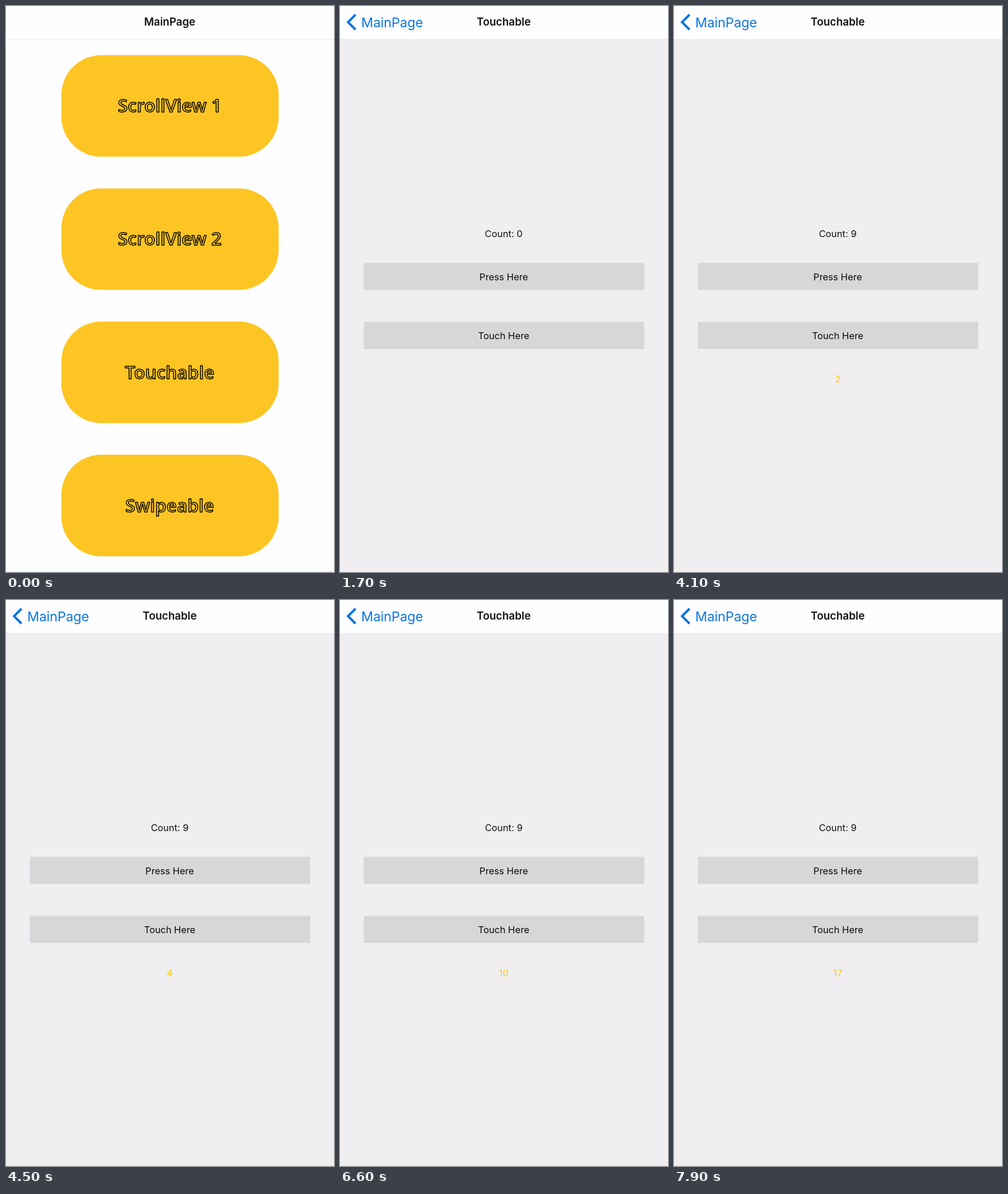
Animation, 570 px wide and 982 px high, one loop 8000 ms. Source, as an HTML page with a canvas:

```html
<!DOCTYPE html>
<html lang="en">
<head>
<meta charset="utf-8">
<title>Touchable demo</title>
<style>
  html, body { margin: 0; width: 100%; height: 100%; overflow: hidden; background: #fefdff; }
  canvas { display: block; width: 570px; height: 982px; }
</style>
</head>
<body>
<canvas id="stage" width="570" height="982"></canvas>
<script>
const ctx = document.getElementById('stage').getContext('2d');
const W = 570, H = 982, LOOP = 8000, STEP = 100, BAR = 58;
const WHITE = '#fefdff', PAGE = '#f0eef1', GREY = '#d8d6d9', LINE = '#e9e8eb';
const YELLOW = '#fdc523', GOLD = '#ffcb0c', BLUE = '#0a76e2', INK = '#111113';
const UI = 'Inter, "Liberation Sans", sans-serif';
const BODY = '16.3px ' + UI;
const CARDS = ['ScrollView 1', 'ScrollView 2', 'Touchable', 'Swipeable'];

const clamp = v => Math.max(0, Math.min(1, v));
const ease = v => (v = clamp(v), v < 0.5 ? 2 * v * v : 1 - 2 * (1 - v) ** 2);
const taps = (start, gap, n) => Array.from({ length: n }, (_, i) => start + i * gap);
const countAt = (list, t) => list.filter(c => c <= t).length;

const PUSH = 770, STIFFNESS = 16.4;
const CARD_TAP = [{ down: 560, up: 778 }];
// Quick taps: each finger-down follows the previous release by 70 ms.
const pressUps = taps(2040, 200, 9);
const PRESS_TAPS = pressUps.map(up => ({ down: up - 130, up }));
const touchUps = [...taps(3780, 217, 8), ...taps(6287, 193, 9)];

// Opacity dips to 0.2 while held and recovers after release.
function touchOpacity(list, t) {
  let alpha = 1;
  list.forEach(({ down, up }, i) => {
    if (t < down) return;
    const from = i ? 0.2 + 0.8 * ease((down - list[i - 1].up) / 250) : 1;
    alpha = t < up
      ? from + (0.2 - from) * ease((t - down) / 120)
      : 0.2 + 0.8 * ease((t - up) / 250);
  });
  return alpha;
}

// Critically damped spring from 0 to 1.
function pushProgress(t) {
  const k = Math.max(0, t - PUSH) / 1000 * STIFFNESS;
  const p = 1 - (1 + k) * Math.exp(-k);
  return p > 0.999 ? 1 : p;
}

function box(x, y, w, h, color) {
  ctx.fillStyle = color;
  ctx.fillRect(x, y, w, h);
}

function label(str, x, y, font, color, align = 'center') {
  ctx.font = font;
  ctx.fillStyle = color;
  ctx.textAlign = align;
  ctx.fillText(str, x, y);
}

function faded(alpha, draw) {
  ctx.save();
  ctx.globalAlpha = alpha;
  draw();
  ctx.restore();
}

function card(name, y) {
  ctx.fillStyle = YELLOW;
  ctx.beginPath();
  ctx.roundRect(96.3, y, 377.5, 176.2, 69);
  ctx.fill();
  ctx.font = '600 31.5px "Open Sans", "Noto Sans", sans-serif';
  ctx.textAlign = 'center';
  ctx.strokeStyle = '#000';
  ctx.lineWidth = 1.5;
  ctx.lineJoin = 'round';
  ctx.strokeText(name, 284.5, y + 99);
}

function mainPage(t, x) {
  ctx.save();
  ctx.translate(x, 0);
  CARDS.forEach((name, i) => {
    const alpha = name === 'Touchable' ? touchOpacity(CARD_TAP, t) : 1;
    faded(alpha, () => card(name, 85.3 + 231.1 * i));
  });
  ctx.restore();
  box(0, 980, W, 2, '#f3f2f4');
}

function button(name, y, color) {
  box(41.4, y, 487.2, 47.2, color);
  label(name, 284.5, y + 30, BODY, '#0a0a0b');
}

function touchPage(t, x) {
  ctx.save();
  ctx.translate(x, 0);
  box(0, BAR, W, H - BAR, PAGE);
  label('Count: ' + countAt(pressUps, t), 284.5, 401, BODY, INK);
  faded(touchOpacity(PRESS_TAPS, t), () => button('Press Here', 445.6, GREY));
  const lit = touchUps.some(c => Math.abs(t - c) < 60);
  if (lit) box(13.7, 519.8, 542.6, 102.6, '#000');
  button('Touch Here', 547.8, lit ? '#b3b1b4' : GREY);
  const n = countAt(touchUps, t);
  if (n) label(n, 284.5, 652.7, BODY, GOLD);
  ctx.restore();
}

function header(p) {
  const font = '600 18.6px ' + UI;
  box(0, 0, W, BAR, WHITE);
  box(0, BAR - 0.5, W, 1, LINE);
  faded((1 - p) ** 2, () => label('MainPage', 284.5, 34, font, INK));
  faded(p, () => {
    label('Touchable', 284.5, 34, font, INK);
    label('MainPage', 37, 36.5, '22.9px ' + UI, BLUE, 'left');
    ctx.strokeStyle = BLUE;
    ctx.lineWidth = 4;
    ctx.lineJoin = 'miter';
    ctx.beginPath();
    ctx.moveTo(27, 15);
    ctx.lineTo(14, 28);
    ctx.lineTo(27, 41);
    ctx.stroke();
  });
}

function render(t) {
  const p = pushProgress(t);
  box(0, 0, W, H, WHITE);
  if (p < 1) mainPage(t, -0.3 * W * p);
  if (p > 0) touchPage(t, W * (1 - p));
  header(p);
}

const begin = performance.now();
function tick() {
  const t = (performance.now() - begin) % LOOP;
  render(Math.floor(t / STEP) * STEP);
  requestAnimationFrame(tick);
}
tick();
</script>
</body>
</html>
```
